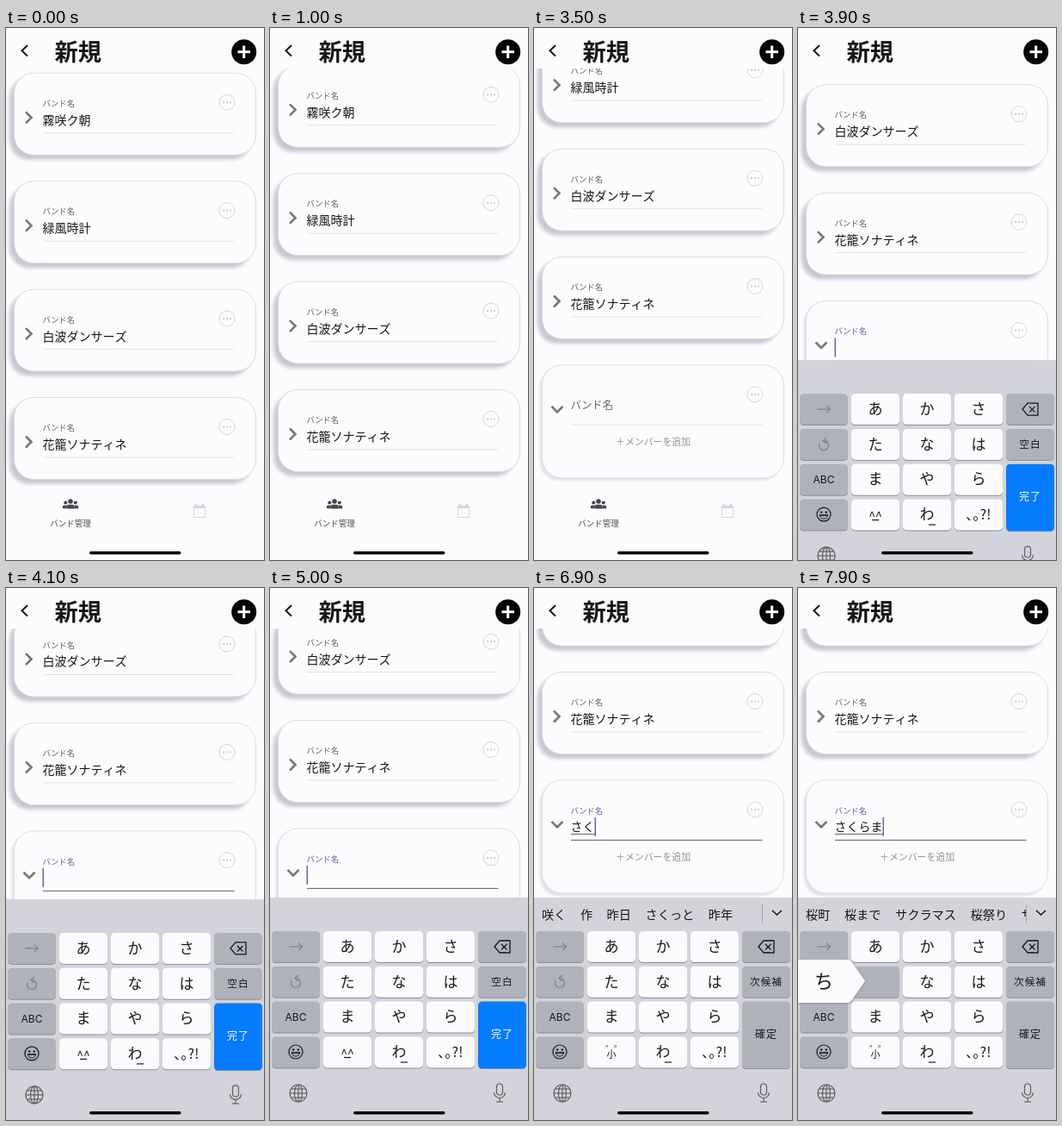
These frames come from a looping animation (300 by 617 pixels, 8 s). An HTML page with a canvas:

```html
<!DOCTYPE html>
<html lang="ja">
<head>
<meta charset="utf-8">
<style>
html, body { margin: 0; width: 100%; height: 100%; overflow: hidden; background: #fcfcfe; }
canvas { display: block; }
</style>
</head>
<body>
<canvas width="300" height="617"></canvas>
<script>
const c = document.querySelector('canvas').getContext('2d');
const FONT = '"Noto Sans CJK JP", "Noto Sans CJK", "Noto Sans", sans-serif';
const PAGE = '#fcfcfe', INK = '#17161a', MUTED = '#77757a', PALE = '#dddae4', RULE = '#e2e0e8';
const KEYBOARD = '#d3d4db', GREY = '#b0b2bb', KEY_EDGE = '#8c8d94', ICON = '#5f6067', PURPLE = '#6d5ca6';
const LOOP = 8000, PITCH = 125.4, KB_HEIGHT = 258, FOCUS = 3650;

const bands = ['霧咲ク朝', '緑風時計', '白波ダンサーズ', '花籠ソナティネ'];
const kana = ['あかさ', 'たなは', 'まやら'];
const typed = [[6100, 'さ'], [6900, 'さく'], [7200, 'さくら'], [7500, 'さくらま']];
const candidates = {
  'さ': ['さん', 'さらに', 'さっき', '先に', 'さて'],
  'さく': ['咲く', '作', '昨日', 'さくっと', '昨年'],
  'さくら': ['桜', 'さくら', 'サクラ', '桜色', '桜餅'],
  'さくらま': ['桜町', '桜まで', 'サクラマス', '桜祭り', 'サクラ']
};
// Key presses: start, end, kana, then flick start and flicked kana
const presses = [
  [6000, 6100, 'さ'], [6600, 6900, 'か', 6700, 'く'], [7100, 7200, 'ら'],
  [7400, 7500, 'ま'], [7800, 8000, 'た', 7900, 'ち']
];

const span = (t, a, b) => Math.min(1, Math.max(0, (t - a) / (b - a)));
const easeOut = u => 1 - (1 - u) ** 3;
const smooth = u => u * u * (3 - 2 * u);

function text(s, x, y, size, color = INK, align = 'left', weight = 400, font = FONT) {
  c.font = `${weight} ${size}px ${font}`;
  c.textAlign = align;
  c.fillStyle = color;
  c.fillText(s, x, y + size * 0.37);
}
function line(color, width, ...p) {
  c.beginPath();
  for (let i = 0; i < p.length; i += 2) c.lineTo(p[i], p[i + 1]);
  c.strokeStyle = color;
  c.lineWidth = width;
  c.stroke();
}
function box(x, y, w, h, r, fill) {
  c.beginPath();
  c.roundRect(x, y, w, h, r);
  c.fillStyle = fill;
  c.fill();
}
function disc(x, y, r, fill) {
  c.beginPath();
  c.arc(x, y, r, 0, 7);
  c.fillStyle = fill;
  c.fill();
}
function ring(x, y, r, color, width, a = 0, b = Math.PI * 2) {
  c.beginPath();
  c.arc(x, y, r, a, b);
  c.strokeStyle = color;
  c.lineWidth = width;
  c.stroke();
}
function shadow(color, dx, dy, blur) {
  c.shadowColor = color;
  c.shadowOffsetX = dx;
  c.shadowOffsetY = dy;
  c.shadowBlur = blur;
}
const noShadow = () => shadow('transparent', 0, 0, 0);

function keyboardTop(t) {
  const k = Math.max(0, t - FOCUS) * 0.0155;
  return 617 - KB_HEIGHT * (1 - (1 + k) * Math.exp(-k));
}
function scrollAt(t) {
  return 9 * easeOut(span(t, 0, 900)) + 154 * easeOut(span(t, 2000, 2700))
    + Math.max(0, 471 - keyboardTop(t - 30)) + 56 * smooth(span(t, 5100, 5800));
}
function composing(t) {
  return typed.filter(e => e[0] <= t).pop() || [FOCUS, ''];
}

function cardFrame(y, h, open) {
  if (open) shadow('#e3e0e9', -3, 3, 3);
  else shadow('#cbc6d0', -5.5, 5.5, 4);
  box(9.5, y, 281, h, 23, PAGE);
  noShadow();
  c.strokeStyle = PALE;
  c.lineWidth = 1;
  c.stroke();
  ring(257, y + 34, 9, '#d6d4de', 1);
  for (const x of [253, 257, 261]) disc(x, y + 34, 1, '#c6c4ce');
}
function card(y, name) {
  cardFrame(y, 95, false);
  line(MUTED, 2.6, 23, y + 45, 29.5, y + 51.5, 23, y + 58);
  text('バンド名', 42.5, y + 35.3, 9.4, '#626066');
  text(name, 42.5, y + 54.3, 14);
  line(RULE, 1, 43, y + 69.5, 265, y + 69.5);
}
function newCard(y, t) {
  const [since, value] = composing(t);
  const focused = t >= FOCUS, lift = smooth(span(t, FOCUS, FOCUS + 170));
  cardFrame(y, 131, true);
  line(MUTED, 2.6, 20.5, y + 48, 27, y + 54.5, 33.5, y + 48);
  text('バンド名', 42.5, y + 47 - 11.7 * lift, 12.4 - 3 * lift, focused ? PURPLE : '#626066');
  line(focused ? '#5f5d64' : RULE, 1, 43, y + 69.5, 265.5, y + 69.5);
  text('＋メンバーを追加', 95, y + 89.3, 10.9, '#929096');
  if (!focused) return;
  const end = 43 + value.length * 14;
  if (value) {
    text(value, 42.5, y + 54.3, 14);
    line('#5f5d64', 1, 43, y + 62.5, end, y + 62.5);
  }
  if (Math.floor((t - since) / 500) % 2 === 0) {
    c.fillStyle = PURPLE;
    c.fillRect(end - 0.5, y + 43, 1.5, 22);
  }
}

function header(t) {
  c.fillStyle = PAGE;
  c.fillRect(0, 0, 300, 47);
  line(INK, 2, 25, 20, 18.5, 26.3, 25, 32.6);
  text('新規', 56.5, 28, 27.3, INK, 'left', 700);
  if (t >= 1900 && t < 2400) {
    c.globalAlpha = 1 - span(t, 2000, 2400);
    disc(277, 27.5, 23, '#e9e7ee');
    c.globalAlpha = 1;
  }
  disc(276.7, 27.7, 14.5, '#020203');
  line('#fff', 3, 269.5, 27.7, 284, 27.7);
  line('#fff', 3, 276.7, 20.5, 276.7, 35);
}
function person(x, y, r) {
  disc(x, y, r, '#4a484e');
  box(x - r * 1.7, y + r + 1, r * 3.4, r * 1.7, [r, r, 0, 0], '#4a484e');
}
function navigation() {
  c.fillStyle = PAGE;
  c.fillRect(0, 531, 300, 86);
  person(69.3, 550.5, 2.1);
  person(80.7, 550.5, 2.1);
  box(70, 551.5, 10, 8, 4, PAGE);
  person(75, 549, 2.8);
  text('バンド管理', 75, 574, 9.5, '#4a484e', 'center');
  c.strokeStyle = '#d6d4de';
  c.lineWidth = 1;
  c.strokeRect(218.5, 554.5, 13, 13);
  c.fillStyle = '#d6d4de';
  c.fillRect(218, 554, 14, 3);
  c.fillRect(220, 552, 2, 3);
  c.fillRect(228, 552, 2, 3);
}

function key(col, row, fill, label, size = 17, color = INK, rows = 1) {
  const x = 2 + col * 60, y = 39 + row * 40.8, h = 36 + (rows - 1) * 41.5;
  box(x, y + 1, 56, h, 4.5, KEY_EDGE);
  box(x, y, 56, h, 4.5, fill);
  if (label) text(label, x + 28, y + h / 2 - 0.5, size, color, 'center');
}
function sideIcons() {
  const soft = '#7d7e86';
  line(soft, 1.2, 22, 57, 37, 57);
  line(soft, 1.2, 33, 53, 37.5, 57, 33, 61);
  ring(30, 99, 5.5, soft, 1.2, -1.5, 3.6);
  line(soft, 1.2, 33, 90, 29, 93.5, 33, 97);
  line(INK, 1.3, 261, 57, 267, 50, 279, 50, 279, 64, 267, 64, 261, 57, 267, 50);
  line(INK, 1.3, 269, 54, 275.5, 60.5);
  line(INK, 1.3, 275.5, 54, 269, 60.5);
  text('ABC', 30, 138.5, 12, INK, 'center', 400, 'Inter, sans-serif');
  ring(30, 179, 8, INK, 1.2);
  disc(27.2, 176.5, 1.2, INK);
  disc(32.8, 176.5, 1.2, INK);
  ring(30, 179.5, 4.6, INK, 1, 0, Math.PI);
  line(INK, 1.6, 25, 180, 35, 180);
}
function bottomIcons() {
  ring(33, 227, 10, ICON, 1.2);
  c.beginPath();
  c.ellipse(33, 227, 4.5, 10, 0, 0, 7);
  c.stroke();
  line(ICON, 1.2, 33, 217, 33, 237);
  for (const [dy, w] of [[-5, 8.5], [0, 10], [5, 8.5]]) line(ICON, 1.2, 33 - w, 227 + dy, 33 + w, 227 + dy);
  c.beginPath();
  c.roundRect(263.5, 216, 7, 13, 3.5);
  c.stroke();
  ring(267, 226, 6.5, ICON, 1.2, 0, Math.PI);
  line(ICON, 1.2, 267, 232.5, 267, 237);
  line(ICON, 1.2, 263, 237, 271, 237);
}
function candidateBar(words) {
  c.save();
  c.beginPath();
  c.rect(0, 0, 265.5, 39);
  c.clip();
  let x = 9;
  for (const w of words) {
    text(w, x, 20, 14.2);
    x += w.length * 14.2 + 16.5;
  }
  c.restore();
  line('#a3a4ab', 1, 265.5, 8, 265.5, 30);
  line(INK, 1.5, 277, 15, 282.5, 20, 288, 15);
}
function popup(label) {
  shadow(KEY_EDGE, 0, 1, 3);
  c.beginPath();
  if (label === 'ち') {
    c.moveTo(0, 72); c.lineTo(57, 72); c.quadraticCurveTo(61, 72, 64, 77);
    c.lineTo(78, 97); c.lineTo(64, 117); c.quadraticCurveTo(61, 122, 57, 122); c.lineTo(0, 122);
  } else {
    c.roundRect(120, -8, 60, 48, 6);
    c.moveTo(120, 36); c.lineTo(180, 36); c.lineTo(150, 56);
  }
  c.fillStyle = PAGE;
  c.fill();
  noShadow();
  if (label === 'ち') text(label, 30, 96.5, 22, INK, 'center');
  else text(label, 150, 17, 22, INK, 'center');
}
function keyboard(t) {
  const top = keyboardTop(t);
  if (top >= 617) return;
  const value = composing(t)[1];
  const press = presses.find(p => t >= p[0] && t < p[1]) || [];
  const flicked = t >= press[3];
  c.save();
  c.translate(0, top);
  c.fillStyle = KEYBOARD;
  c.fillRect(0, 0, 300, KB_HEIGHT);
  if (value) candidateBar(candidates[value]);

  for (let row = 0; row < 4; row++) key(0, row, GREY);
  kana.forEach((letters, row) => [...letters].forEach((k, i) => {
    const down = press[2] === k;
    key(i + 1, row, down ? GREY : PAGE, down && flicked ? '' : k);
  }));
  key(1, 3, PAGE);
  if (value) {
    text('小', 90, 182, 11, INK, 'center');
    text('゛', 83, 177, 11);
    text('゜', 93, 177, 11);
  } else {
    text('^^', 90, 181, 14, INK, 'center');
    line(INK, 1.2, 86, 185.5, 94, 185.5);
  }
  key(2, 3, PAGE, 'わ');
  line(INK, 1.2, 152, 191, 160, 191);
  key(3, 3, PAGE, '､｡?!', 16);
  key(4, 0, GREY);
  c.letterSpacing = '1px';
  key(4, 1, GREY, value ? '次候補' : '空白', 11.7);
  key(4, 2, value ? GREY : '#047cfd', value ? '確定' : '完了', 12, value ? INK : '#fff', 2);
  c.letterSpacing = '0px';
  sideIcons();
  bottomIcons();
  if (flicked) popup(press[4]);
  c.restore();
}

function draw(t) {
  const top = 52.3 - scrollAt(t);
  c.fillStyle = PAGE;
  c.fillRect(0, 0, 300, 617);
  bands.forEach((name, i) => card(top + i * PITCH, name));
  if (t >= 2000) newCard(top + 4 * PITCH, t);
  header(t);
  navigation();
  keyboard(t);
  box(97, 607, 106.5, 3.6, 1.8, '#020203');
}

// The screen advances ten times a second
const start = performance.now();
function tick() {
  const t = (performance.now() - start) % LOOP;
  draw(Math.floor(t / 100) * 100);
  requestAnimationFrame(tick);
}
tick();
</script>
</body>
</html>
```
